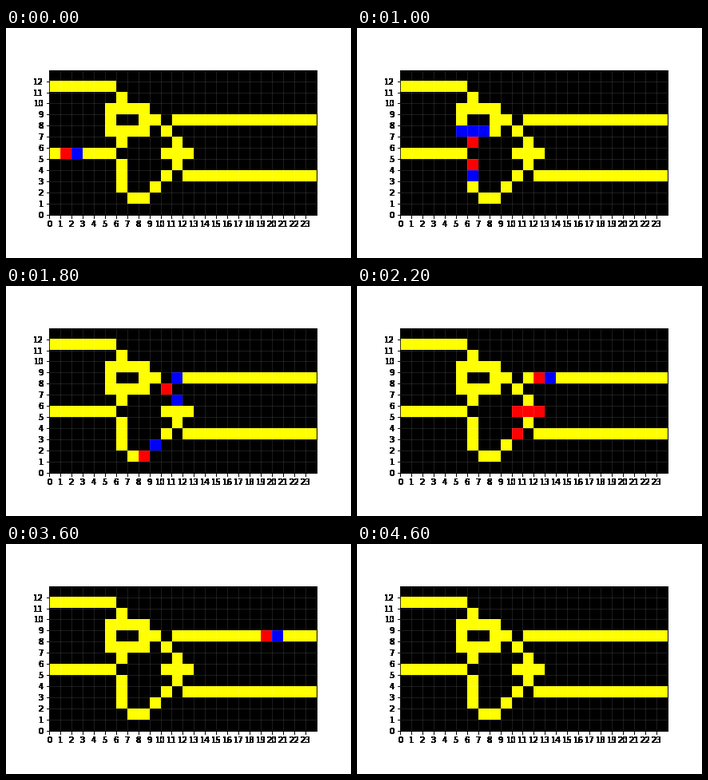
A matplotlib script that plays this animation: 432x288 px, repeating every 8 s.

```python
import matplotlib.pyplot as plt
import numpy as np
from matplotlib.animation import FuncAnimation
from matplotlib.colors import ListedColormap

# Wireworld: one electron meets two diodes
COLS, ROWS = 24, 13
STEPS, INTERVAL = 40, 200
EMPTY, WIRE, HEAD, TAIL = range(4)
COLORS = ListedColormap(["black", "yellow", "blue", "red"])

# Corner points (x, y) of each wire; every leg is straight or diagonal
INPUTS = [[(0, 11), (5, 11), (6, 10)], [(0, 5), (5, 5), (6, 6)]]
RING = [(5, 7), (5, 9), (8, 9), (8, 7), (5, 7)]
BEND = [(9, 8), (11, 6), (11, 4), (8, 1), (7, 1), (6, 2), (6, 4)]
BAR = [(10, 5), (12, 5)]
OUTPUTS = [[(11, 8), (COLS - 1, 8)], [(12, 3), (COLS - 1, 3)]]


def lay_wire(grid, points):
    for (x0, y0), (x1, y1) in zip(points, points[1:]):
        n = max(abs(x1 - x0), abs(y1 - y0)) + 1
        grid[np.linspace(y0, y1, n).astype(int),
             np.linspace(x0, x1, n).astype(int)] = WIRE


def start_grid():
    grid = np.full((ROWS, COLS), EMPTY)
    for wire in [*INPUTS, RING, BEND, BAR, *OUTPUTS]:
        lay_wire(grid, wire)
    grid[5, 1:3] = TAIL, HEAD
    return grid


def step(grid):
    heads = np.pad((grid == HEAD).astype(int), 1)
    near = sum(heads[dy:dy + ROWS, dx:dx + COLS]
               for dy in range(3) for dx in range(3) if (dy, dx) != (1, 1))
    new = grid.copy()
    new[grid == HEAD] = TAIL
    new[grid == TAIL] = WIRE
    new[(grid == WIRE) & ((near == 1) | (near == 2))] = HEAD
    return new


def harden_edges(fig):
    """Put solid black under every antialiased pixel of text and ticks."""
    fig.patch.set_alpha(0)
    fig.canvas.draw()
    blank = np.asarray(fig.canvas.buffer_rgba())[..., 3] == 0
    fig.patch.set_alpha(1)
    under = np.repeat(blank[..., None] * np.uint8(255), 3, axis=2)
    fig.figimage(under, origin="upper", zorder=-1)


history = [start_grid()]
while len(history) < STEPS:
    history.append(step(history[-1]))

plt.rcParams.update({"font.family": "DejaVu Sans", "font.size": 10})
fig, ax = plt.subplots(figsize=(6, 4), dpi=72, facecolor="white")
fig.subplots_adjust(left=0.125, right=0.9, bottom=0.125, top=0.88)
image = ax.imshow(history[0], cmap=COLORS, vmin=EMPTY, vmax=TAIL, origin="lower",
                  interpolation="nearest", extent=(0, COLS, 0, ROWS))
ax.set_xticks(range(COLS))
ax.set_yticks(range(ROWS))
ax.grid(color="white", alpha=0.14, linewidth=0.8)
harden_edges(fig)


def update(i):
    image.set_data(history[i])
    return [image]


anim = FuncAnimation(fig, update, frames=STEPS, interval=INTERVAL,
                     repeat=True, repeat_delay=0)
plt.show()
```
